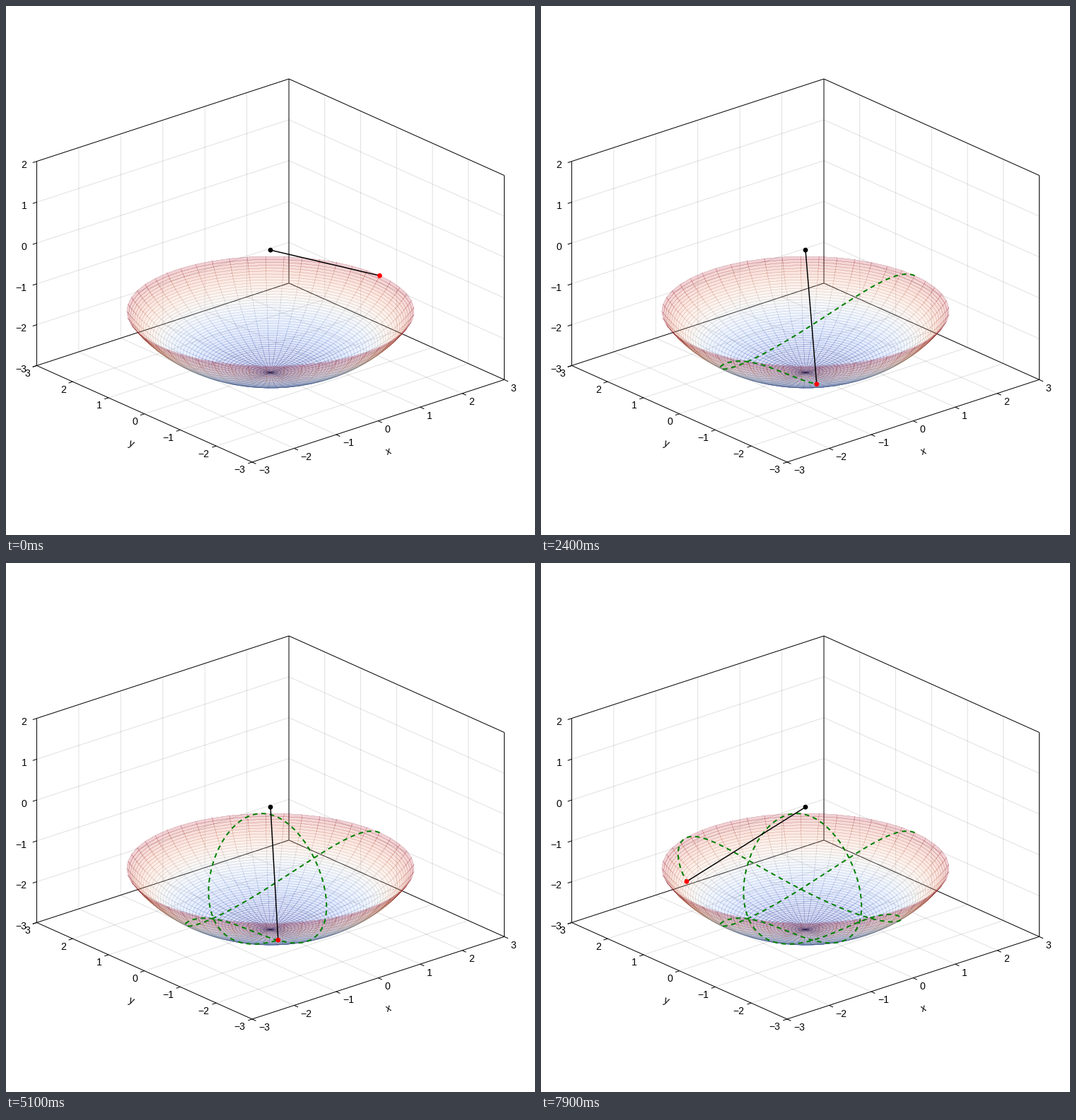
Write a matplotlib script that moves like this. It is 748 by 748 pixels and loops after 8 s.

```python
import numpy as np
import matplotlib.pyplot as plt
from matplotlib.animation import FuncAnimation
from matplotlib.collections import LineCollection, PolyCollection
from matplotlib.patches import Circle

SIZE, DPI = 748, 100
PX = 72 / DPI
FRAMES, STEP_MS = 80, 100
G, L = 9.81, 3.0
SUB, KEEP = 20, 4  # integration steps per frame, steps per trail point

# Orthographic view
AZ, EL, SCALE = 1.275 * np.pi, np.pi / 8, 78.15
EX = SCALE * np.array([-np.sin(AZ), np.cos(AZ) * np.sin(EL)])
EY = SCALE * np.array([np.cos(AZ), np.sin(AZ) * np.sin(EL)])
EZ = SCALE * np.array([0, -0.8 * np.cos(EL)])
ORIGIN = np.array([SIZE / 2, SIZE / 2 + 0.5 * EZ[1]])


def project(x, y, z):
    x, y, z = (np.asarray(v, float)[..., None] for v in (x, y, z))
    return ORIGIN + x * EX + y * EY + z * EZ


def unit(v):
    return v / np.hypot(*v)


def sphere(theta, phi):
    return (L * np.sin(theta) * np.cos(phi),
            L * np.sin(theta) * np.sin(phi),
            -L * np.cos(theta))


def segment(a, b):
    return [project(*a), project(*b)]


def rates(s):
    th, ph, dth, dph = s
    return np.array([dth, dph,
                     np.sin(th) * np.cos(th) * dph ** 2 - G / L * np.sin(th),
                     -2 * dth * dph / np.tan(th)])


def simulate():
    h = STEP_MS / 1000 / SUB
    s = np.array([np.pi / 3, 0, 0, np.pi / 4])
    out = [s]
    for _ in range((FRAMES - 1) * SUB):
        k1 = rates(s)
        k2 = rates(s + h / 2 * k1)
        k3 = rates(s + h / 2 * k2)
        k4 = rates(s + h * k3)
        s = s + h / 6 * (k1 + 2 * k2 + 2 * k3 + k4)
        out.append(s)
    out = np.array(out[::KEEP])
    return project(*sphere(out[:, 0], out[:, 1]))


fig = plt.figure(figsize=(SIZE / DPI, SIZE / DPI), dpi=DPI, facecolor="white")
ax = fig.add_axes([0, 0, 1, 1])
ax.set_xlim(0, SIZE)
ax.set_ylim(SIZE, 0)
ax.axis("off")


def draw_lines(paths, width, color, z):
    lines = LineCollection(paths, linewidths=width * PX, colors=[color], zorder=z)
    lines.set_snap(False)
    ax.add_collection(lines)


def label(pos, text, ha, **kw):
    ax.text(*pos, text, ha=ha, va="baseline", fontsize=14 * PX,
            family="Liberation Sans", color="black", **kw)


def draw_dot(pos, color):
    return ax.add_patch(Circle(pos, 3.4, fc=color, ec="none", lw=0, zorder=7))


def draw_box():
    lo, hi, bottom, top = -3, 3, -3, 2
    grid = []
    for v in range(-2, 3):
        grid += [segment((v, lo, bottom), (v, hi, bottom)),
                 segment((lo, v, bottom), (hi, v, bottom)),
                 segment((v, hi, bottom), (v, hi, top)),
                 segment((hi, v, bottom), (hi, v, top))]
    for v in range(-2, 2):
        grid += [segment((lo, hi, v), (hi, hi, v)),
                 segment((hi, lo, v), (hi, hi, v))]
    draw_lines(grid, 1, (0, 0, 0, 0.12), 1)

    spines = [segment((x, y, bottom), (x, y, top))
              for x, y in ((lo, hi), (hi, hi), (hi, lo))]
    spines += [segment((lo, hi, z), (hi, hi, z)) for z in (bottom, top)]
    spines += [segment((hi, lo, z), (hi, hi, z)) for z in (bottom, top)]
    spines += [segment((lo, lo, bottom), (hi, lo, bottom)),
               segment((lo, lo, bottom), (lo, hi, bottom))]

    out_x, out_y = -unit(EX), -unit(EY)
    for v in range(-3, 4):
        text = str(v).replace("-", "\u2212")
        marks = [(project(v, lo, bottom), out_y, 10, "left", 12.3),
                 (project(lo, v, bottom), out_x, 10, "right", 12.3)]
        if v <= top:
            marks.append((project(lo, hi, v), out_x, 15, "right", 5))
        for p, d, gap, ha, drop in marks:
            spines.append([p, p + 6 * d])
            label(p + gap * d + (0, drop), text, ha)
    draw_lines(spines, 1, "black", 2)

    for name, mid, d in (("x", project(0, lo, bottom), unit(EX)),
                         ("y", project(lo, 0, bottom), -unit(EY))):
        down = np.array([-d[1], d[0]])
        label(mid + 50 * down, name, "center", rotation_mode="anchor",
              rotation=-np.degrees(np.arctan2(d[1], d[0])))


def draw_bowl(n=50):
    th, ph = np.meshgrid(np.linspace(0, np.pi / 3, n),
                         np.linspace(0, 2 * np.pi, n), indexing="ij")
    x, y, z = sphere(th, ph)
    p = project(x, y, z)
    quads = np.stack([p[:-1, :-1], p[1:, :-1], p[1:, 1:], p[:-1, 1:]], axis=2)

    def middle(a):
        return ((a[:-1, :-1] + a[1:, :-1] + a[1:, 1:] + a[:-1, 1:]) / 4).ravel()

    near = np.cos(EL) * (np.cos(AZ) * x + np.sin(AZ) * y) + np.sin(EL) * z
    order = np.argsort(middle(near))
    tint = plt.get_cmap("coolwarm")((middle(z) + 3) / 1.5)
    tint[:, 3] = 0.2
    ax.add_collection(PolyCollection(
        quads.reshape(-1, 4, 2)[order], facecolors=tint[order],
        edgecolors="none", linewidths=0, antialiaseds=False, zorder=3))
    wires = list(p[1:]) + list(p.transpose(1, 0, 2)[:-1])
    draw_lines(wires, 0.5, (0, 0, 0, 0.13), 4)


draw_box()
draw_bowl()

path = simulate()
pivot = project(0, 0, 0)
trail, = ax.plot([], [], color="green", lw=2 * PX, ls=(0, (3.3, 2.7)),
                 dash_capstyle="butt", snap=False, zorder=5)
rod, = ax.plot([], [], color="black", lw=1.5 * PX, snap=False, zorder=6)
draw_dot(pivot, "black")
bob = draw_dot(path[0], "red")


def update(i):
    last = i * SUB // KEEP
    x, y = path[last]
    trail.set_data(*path[:last + 1].T)
    rod.set_data([pivot[0], x], [pivot[1], y])
    bob.center = x, y
    return trail, rod, bob


anim = FuncAnimation(fig, update, frames=FRAMES, interval=STEP_MS,
                     repeat=True, repeat_delay=0)
plt.show()
```
